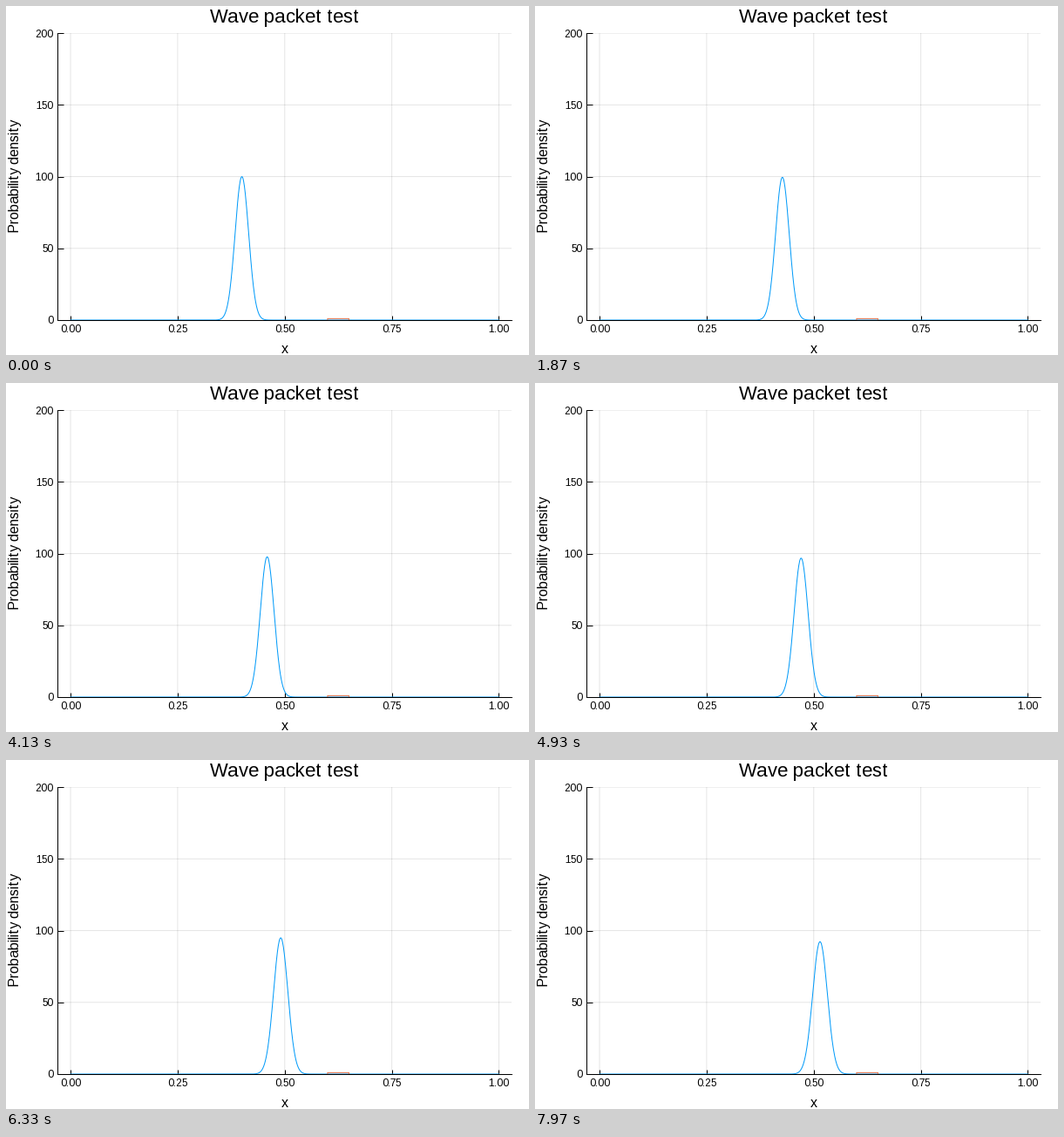
A matplotlib script that plays this animation: 600x400 px, repeating every 8000 ms.

```python
import numpy as np
import matplotlib.pyplot as plt
from matplotlib.animation import FuncAnimation

W, H, DPI = 600, 400, 100
PX = 72 / DPI                      # one pixel in points
LEFT, RIGHT, TOP, BOTTOM = 59.3, 580.2, 31.1, 360
FRAMES, LOOP_MS = 240, 8000

START, SPEED = 0.4, 0.00048        # packet centre and its step per frame
PEAK, SHARPNESS = 100, 2000
SPREAD = 573                       # frames until the width grows by sqrt(2)

plt.rcParams["font.family"] = "Liberation Sans"
plt.rcParams["text.hinting_factor"] = 1   # whole-pixel letter advances

fig = plt.figure(figsize=(W / DPI, H / DPI), dpi=DPI, facecolor="white")
ax = fig.add_axes([LEFT / W, 1 - BOTTOM / H,
                   (RIGHT - LEFT) / W, (BOTTOM - TOP) / H])
ax.set_xlim(-0.03, 1.03)
ax.set_ylim(0, 200)
ax.set_xticks(np.linspace(0, 1, 5))
ax.set_yticks(np.arange(0, 201, 50))
ax.xaxis.set_major_formatter("{x:.2f}")

ax.grid(color="black", alpha=0.1, linewidth=PX, snap=False)
ax.set_axisbelow(True)
ax.tick_params(direction="in", width=PX, labelsize=11.8 * PX)
ax.tick_params(axis="x", length=5 * PX, pad=5.5 * PX)
ax.tick_params(axis="y", length=7 * PX, pad=5 * PX)
for side in ("top", "right"):
    ax.spines[side].set_visible(False)
for side in ("left", "bottom"):
    ax.spines[side].set_linewidth(PX)
    ax.spines[side].set_zorder(5)


def label(x, y, text, size, **kw):
    fig.text(x / W, 1 - y / H, text, fontsize=size * PX, ha="center",
             va="baseline", **kw)


label(320, 18.6, "Wave packet test", 21.6)
label(320, 398, "x", 16)
label(15, 195.5, "Probability density", 16,
      rotation=90, rotation_mode="anchor")

x = np.linspace(0, 1, 1001)
packet, = ax.plot([], [], color="#009AF9", linewidth=PX)
ax.plot([0.6, 0.6, 0.65, 0.65], [0, 1, 1, 0], color="#E26F46",
        linewidth=PX, snap=False)


def density(n):
    growth = 1 + (n / SPREAD) ** 2
    offset = x - START - SPEED * n
    return PEAK / np.sqrt(growth) * np.exp(-SHARPNESS * offset ** 2 / growth)


def update(n):
    packet.set_data(x, density(n))
    return packet,


anim = FuncAnimation(fig, update, frames=FRAMES, interval=LOOP_MS / FRAMES,
                     repeat=True, repeat_delay=0, blit=False)
plt.show()
```
